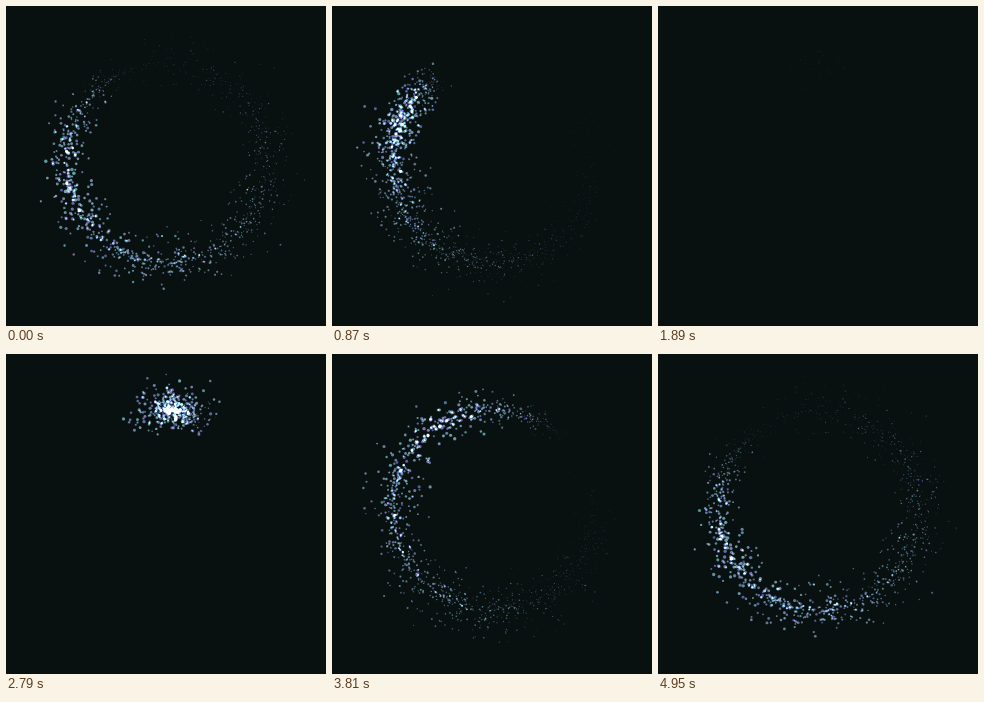
These frames come from a looping animation (320x320 px, 4980 ms). An HTML page with a canvas:

```html
<!DOCTYPE html>
<html lang="en">
<head>
<meta charset="utf-8">
<title>Particle ring</title>
<style>
  html, body { margin: 0; width: 100%; height: 100%; overflow: hidden; background: #081110; }
  canvas { display: block; width: 100vmin; height: 100vmin; }
</style>
</head>
<body>
<canvas id="stage" width="320" height="320"></canvas>
<script>
const LOOP = 4980, START = 2528;      // emission begins at START and wraps around the loop
const EMIT = 3680, RAMP = 1109;       // emission time; speed-up and slow-down time
const TURNS = 4, COUNT = 7200;
const CX = 161, CY = 156, RADIUS = 100;
const GROW = 160;                     // time a particle takes to reach full size
const ctx = document.getElementById('stage').getContext('2d');

let seed = 71;
function random() {
  seed = (seed + 0x6D2B79F5) | 0;
  let n = Math.imul(seed ^ (seed >>> 15), 1 | seed);
  n = (n + Math.imul(n ^ (n >>> 7), 61 | n)) ^ n;
  return ((n ^ (n >>> 14)) >>> 0) / 4294967296;
}
const between = (a, b) => a + (b - a) * random();

// Ramp up, constant speed, ramp down; returns the angle travelled.
function headAngle(u) {
  const speed = TURNS * 2 * Math.PI / (EMIT - RAMP);
  if (u < RAMP) return speed * u * u / (2 * RAMP);
  if (u < EMIT - RAMP) return speed * (u - RAMP / 2);
  return TURNS * 2 * Math.PI - speed * (EMIT - u) ** 2 / (2 * RAMP);
}

const particles = Array.from({ length: COUNT }, (_, i) => {
  const birth = EMIT * i / COUNT;
  const angle = headAngle(birth);
  const sin = Math.sin(angle), cos = Math.cos(angle);
  const heading = between(0, 2 * Math.PI);
  const reach = random() + random() + random() - 1.5;
  const along = 50 * reach * Math.cos(heading);
  const out = 33 * reach * Math.sin(heading);
  return {
    birth,
    x: CX + RADIUS * sin, y: CY - RADIUS * cos,
    dx: out * sin + along * cos, dy: along * sin - out * cos,
    life: between(640, 960),
    size: between(1, 1.75),
    color: `hsl(${between(182, 256)}, ${between(38, 60)}%, ${between(62, 76)}%)`
  };
});

function scaleAt(age, life) {
  if (age < GROW) return Math.sin(age / GROW * Math.PI / 2);
  return (1 - (age - GROW) / (life - GROW)) ** 1.5;
}

function draw(time) {
  const u = (time - START + LOOP) % LOOP;
  ctx.globalCompositeOperation = 'source-over';
  ctx.globalAlpha = 1;
  ctx.fillStyle = '#081110';
  ctx.fillRect(0, 0, 320, 320);
  ctx.globalCompositeOperation = 'lighter';
  for (const p of particles) {
    const age = u - p.birth;
    if (age <= 0 || age >= p.life) continue;
    const scale = scaleAt(age, p.life);
    const spread = 1 - 0.8 * Math.exp(-age / 95);
    ctx.globalAlpha = 0.25 + 0.45 * scale;
    ctx.fillStyle = p.color;
    ctx.beginPath();
    ctx.arc(p.x + p.dx * spread, p.y + p.dy * spread, p.size * scale, 0, 2 * Math.PI);
    ctx.fill();
  }
}

const begin = performance.now();
function tick() {
  draw((performance.now() - begin) % LOOP);
  requestAnimationFrame(tick);
}
tick();
</script>
</body>
</html>
```
